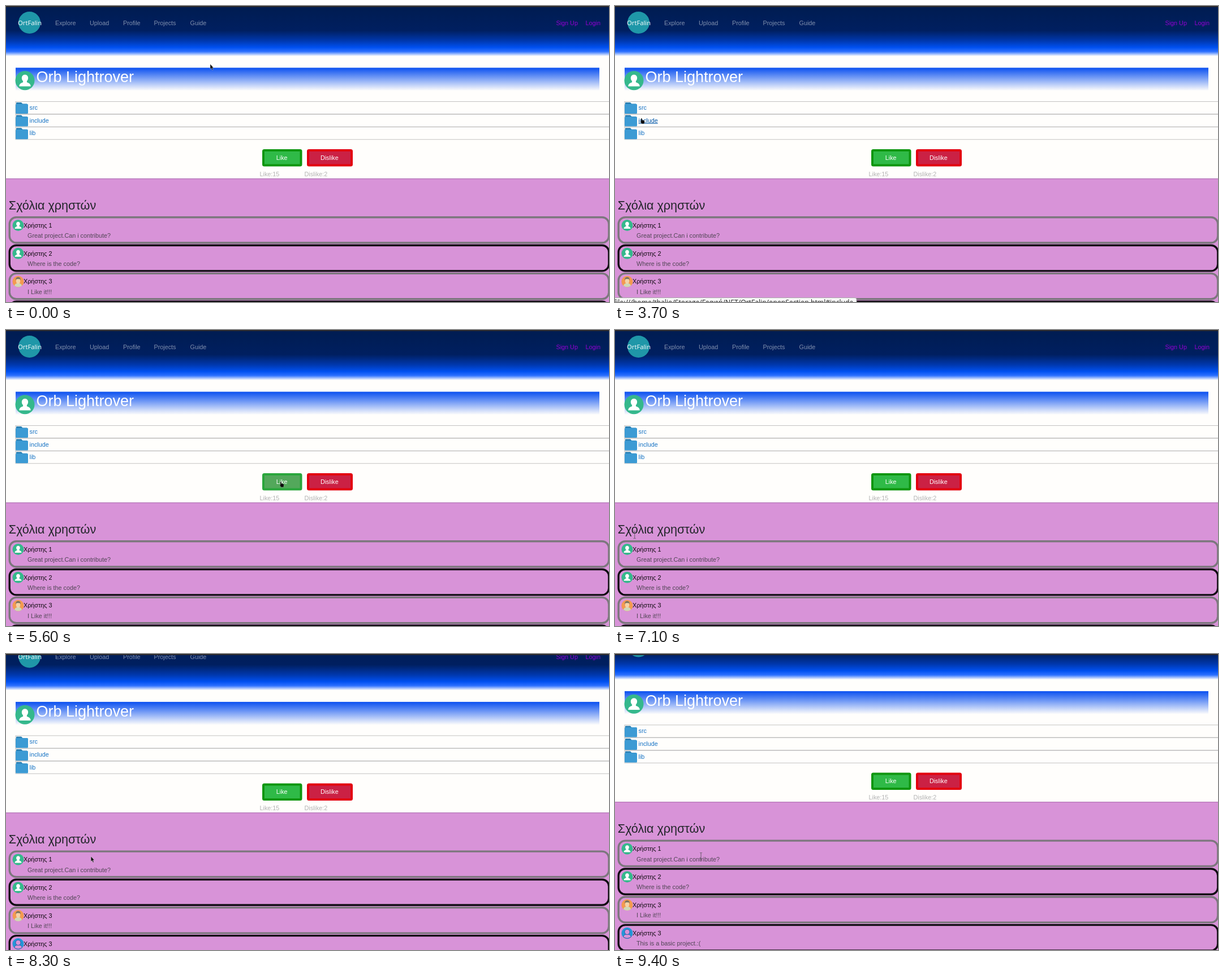
Animation of 1066x525 px, one loop 9500 ms. Source, as an HTML page:

```html
<!DOCTYPE html>
<html lang="el">
<head>
<meta charset="utf-8">
<title>Project page</title>
<style>
html, body { margin: 0; width: 100%; height: 100%; overflow: hidden; background: #fffefc; }
svg { display: block; font: 10.8px "Liberation Sans", sans-serif; }
.nav { fill: #fff; fill-opacity: .5; }
.sign { fill: #9400d3; }
.brand, #status { font-family: "Open Sans", "Noto Sans", sans-serif; }
.link { fill: #1572c4; }
.link.on { fill: #0056a8; text-decoration: underline; }
.btn { stroke-width: 4; }
#like { fill: #2fba47; stroke: #0f960f; }
#like.on { fill: #53a85b; stroke: #2aa63c; }
#dislike { fill: #cb2144; stroke: #e3000f; }
#dislike.on { fill: #c5485a; stroke: #d8323f; }
.label { fill: #fff; text-anchor: middle; }
.count { fill: #b3b3b3; }
.note { fill: #514655; }
</style>
</head>
<body>
<svg width="1066" height="525" viewBox="0 0 1066 525">
  <defs>
    <linearGradient id="navFill" x2="0" y2="1">
      <stop offset="0" stop-color="#001c50"/>
      <stop offset=".5" stop-color="#001f60"/>
      <stop offset=".7" stop-color="#0038ae"/>
      <stop offset=".83" stop-color="#0050f0"/>
      <stop offset=".91" stop-color="#2c70ff"/>
      <stop offset="1" stop-color="#fffefc"/>
    </linearGradient>
    <linearGradient id="headFill" x2="0" y2="1">
      <stop offset="0" stop-color="#0a50f0"/>
      <stop offset="1" stop-color="#fffefc"/>
    </linearGradient>
    <g id="user">
      <circle r="10" fill="#35b88c"/>
      <path fill="#fff" d="M-6 6Q-6 3-2 1.8V.6C-4.4-2-3.4-6.2 0-6.2S4.4-2 2 .6V1.8Q6 3 6 6Z"/>
    </g>
    <g id="worker">
      <circle r="10" fill="#f39a50"/>
      <path fill="#cfd8b8" d="M-6.5 7.6Q-6 3 0 3T6.5 7.6Q0 12-6.5 7.6Z"/>
      <ellipse cy="-1" rx="3.7" ry="5" fill="#f3d3a8"/>
      <path fill="#77735f" d="M-4.2-2Q-5-8 0-8T4.2-2L3-4.5H-3Z"/>
    </g>
    <g id="outline">
      <circle r="10" fill="#2497d8"/>
      <g fill="#d893d8" stroke="#1a5fa8" stroke-width="1">
        <path d="M-7 6.8Q-6 2 0 2T7 6.8Q0 12-7 6.8Z"/>
        <circle cy="-2" r="4.6"/>
      </g>
    </g>
    <g id="folder">
      <path fill="#2a7fb2" d="M1 4V1.5Q1 .5 2 .5H10L12.5 3H20V6H1Z"/>
      <rect y="3.2" width="22" height="17.3" rx="1.5" fill="#3c9bd4"/>
    </g>
  </defs>

  <g id="page">
    <rect y="-2" width="1066" height="91" fill="url(#navFill)"/>
    <circle cx="41.5" cy="29.5" r="19.5" fill="#1f97a8"/>
    <text class="brand" x="21" y="34" font-size="11.3" fill="#fff">OrtFalin</text>
    <g class="nav">
      <text x="87" y="33.5">Explore</text>
      <text x="148" y="33.5">Upload</text>
      <text x="207" y="33.5">Profile</text>
      <text x="261.5" y="33.5">Projects</text>
      <text x="325.5" y="33.5">Guide</text>
    </g>
    <g class="sign">
      <text x="972.5" y="33.5">Sign Up</text>
      <text x="1024.5" y="33.5">Login</text>
    </g>

    <rect x="17" y="109.5" width="1032" height="41" fill="url(#headFill)"/>
    <use href="#user" transform="translate(33.5 132.3) scale(1.7)"/>
    <text x="53.5" y="135.3" font-size="27" fill="#fff">Orb Lightrover</text>

    <g id="rows"></g>

    <rect id="like" class="btn" x="455" y="256" width="66.5" height="26.5" rx="1.5"/>
    <text class="label" x="487.7" y="273">Like</text>
    <rect id="dislike" class="btn" x="534" y="256" width="77" height="26.5" rx="1.5"/>
    <text class="label" x="571.8" y="273">Dislike</text>
    <text class="count" x="448.5" y="301.6">Like:15</text>
    <text class="count" x="527.5" y="301.6">Dislike:2</text>

    <rect y="306" width="1066" height="300" fill="#d893d8"/>
    <rect y="305.8" width="1066" height="1" fill="#a968ad"/>
    <text x="4.8" y="361" font-size="21.57" fill="#212529">Σχόλια χρηστών</text>
    <g id="comments"></g>
  </g>

  <rect width="1066" height="2" fill="#2b2a2e"/>

  <g id="status">
    <rect id="bar" x="-6" y="517.5" height="20" rx="3" fill="#f8f8f8" stroke="#aaa"/>
    <text id="address" x="-2" y="529.5" font-size="12.2" fill="#222"></text>
  </g>

  <path id="arrow" fill="#0b0b0b" stroke="#fff" stroke-opacity=".55" stroke-width=".6"
        d="M0 0V9L2 7.2L3.6 10.8L5 10.2L3.5 6.7H6Z"/>
  <path id="hand" fill="#0b0b0b" stroke="#fff" stroke-opacity=".4" stroke-width=".4"
        d="M.5 0Q1.8 0 1.8 1.2V3.2L5.4 4Q6.4 4.4 6.2 6L5.6 9.8H1.2L-1 6.2Q-.8 5.2 0 6V.6Z"/>
  <path id="beam" fill="none" stroke="#5c545e" stroke-width=".9"
        d="M-2-6.5H-.7L0-5.8L.7-6.5H2M0-5.8V5.8M-2 6.5H-.7L0 5.8L.7 6.5H2"/>
</svg>
<script>
const LOOP = 9500, STEP = 100;
const $ = id => document.getElementById(id);

const folders = ["src", "include", "lib"];
$("rows").innerHTML = folders.map((name, i) => {
  const y = 169.5 + i * 22.6;
  return `<rect x="17" y="${y}" width="1060" height="22.1" fill="none" stroke="#b4b4b4" stroke-width=".8"/>
    <use href="#folder" x="17" y="${y + 1}"/>
    <text id="${name}" class="link" x="41.5" y="${y + 14.6}">${name}</text>`;
}).join("");

const comments = [
  ["user", 1, "Great project.Can i contribute?"],
  ["user", 2, "Where is the code?"],
  ["worker", 3, "I Like it!!!"],
  ["outline", 3, "This is a basic project.:("]
];
$("comments").innerHTML = comments.map(([icon, n, note], i) =>
  `<g transform="translate(0 ${373 + i * 49.85})">
    <rect x="6.2" y="1.7" width="1059.6" height="45.3" rx="12" fill="none"
      stroke="${i % 2 ? "#100c12" : "#7c777d"}" stroke-width="3.4"/>
    <use href="#${icon}" x="21.5" y="16"/>
    <text x="31" y="19.7" fill="#0c080c">Χρήστης ${n}</text>
    <text class="note" x="38" y="38.2">${note}</text>
  </g>`).join("");

// Pointer path: time, x, y, shape
const path = [
  [0, 361, 103, "arrow"], [300, 361, 103, "arrow"], [400, 331, 103, "arrow"],
  [500, 331, 103, "arrow"], [600, 125, 141, "beam"], [900, 125, 141, "beam"],
  [1300, 77, 138, "beam"], [1600, 150, 153, "beam"], [1900, 220, 140, "beam"],
  [2300, 53, 161, "arrow"], [2500, 37, 145, "arrow"], [2900, 45, 178, "arrow"],
  [3000, 46, 180, "hand"], [3300, 48, 182, "hand"], [3500, 47, 194, "arrow"],
  [3600, 47, 194, "arrow"], [3700, 46, 199, "hand"], [4100, 46, 201, "hand"],
  [4600, 46, 223, "hand"], [4800, 46, 223, "hand"], [5000, 80, 233, "arrow"],
  [5500, 470, 268, "hand"], [5600, 485, 269, "hand"], [5700, 485, 269, "hand"],
  [5900, 545, 271, "hand"], [6200, 575, 274, "hand"], [6300, 420, 285, "arrow"],
  [6400, 208, 297, "arrow"], [6500, 208, 297, "arrow"], [6600, 80, 311, "arrow"],
  [6700, 80, 311, "arrow"], [6900, 18, 361, "beam"], [7000, 18, 361, "beam"],
  [7400, 85, 370, "beam"], [7800, 152, 360, "beam"], [8100, 152, 360, "beam"],
  [8200, 150, 359, "arrow"], [9200, 152, 359, "beam"]
];

// Hovered element: id, from, to
const hovers = [
  ["src", 3000, 3500], ["include", 3700, 4500], ["lib", 4500, 5000],
  ["like", 5500, 5900], ["dislike", 5900, 6300]
];
const addresses = [["src", 3000, 3700], ["include", 3700, 4500], ["lib", 4500, 5100]];
const scrolls = [2.9, 12, 24.6, 33.5, 39.5, 42.5, 43.6];

const within = t => ([, from, to]) => t >= from && t < to;

function pointer(t) {
  const i = path.findLastIndex(p => p[0] <= t);
  const a = path[i], b = path[i + 1] || a;
  const k = b === a ? 0 : (t - a[0]) / (b[0] - a[0]);
  return { x: a[1] + (b[1] - a[1]) * k, y: a[2] + (b[2] - a[2]) * k, shape: a[3] };
}

function draw(time) {
  const t = Math.floor(time % LOOP / STEP) * STEP;
  const scroll = t < 8100 ? 0 : scrolls[Math.min((t - 8100) / STEP, scrolls.length - 1)];
  $("page").setAttribute("transform", `translate(0 ${-scroll})`);

  const p = pointer(t);
  for (const shape of ["arrow", "hand", "beam"]) {
    $(shape).style.display = shape === p.shape ? "" : "none";
  }
  $(p.shape).setAttribute("transform", `translate(${p.x} ${p.y})`);

  for (const h of hovers) $(h[0]).classList.toggle("on", within(t)(h));

  const target = addresses.find(within(t));
  $("status").style.display = target ? "" : "none";
  if (target) {
    $("address").textContent =
      `file:///home/thalio/Storage/Γραφή/NET/OrtFalin/openSection.html#${target[0]}`;
    $("bar").setAttribute("width", target[0] === "include" ? 433 : 409.5);
  }
}

const start = performance.now();
function tick() {
  draw(performance.now() - start);
  requestAnimationFrame(tick);
}
tick();
</script>
</body>
</html>
```
